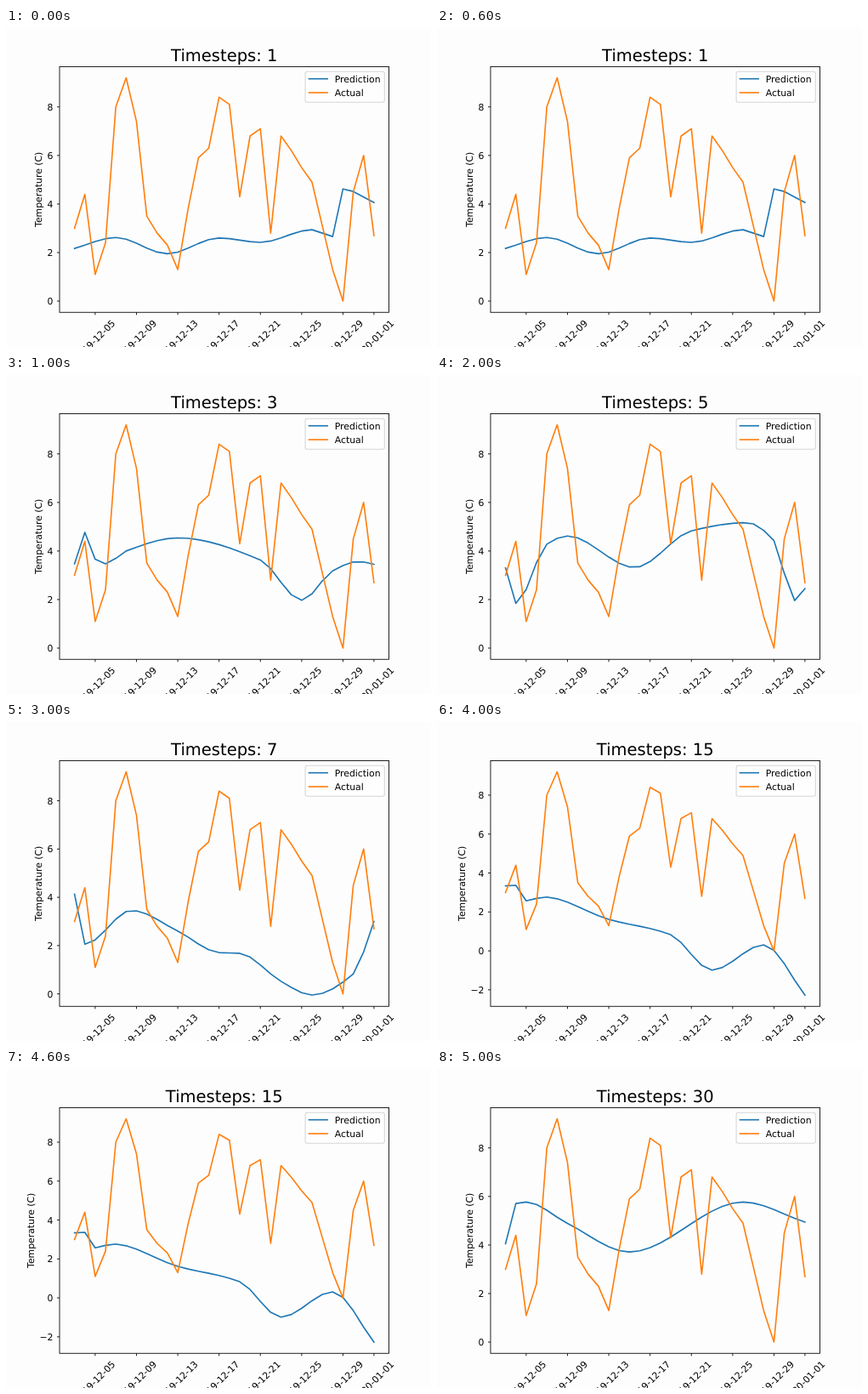
These frames come from a looping animation (500x375 px, 6000 ms). An HTML page:

```html
<!DOCTYPE html>
<html lang="en">
<head>
<meta charset="utf-8">
<title>Temperature forecast by timesteps</title>
<style>
  html, body { margin: 0; width: 100%; height: 100%; overflow: hidden; background: #fdfdfd; }
  svg { display: block; width: 500px; height: 375px; }
  text { font: 10.85px "DejaVu Sans", sans-serif; text-rendering: geometricPrecision; fill: #000; }
  #title { font-size: 19.53px; }
  .mid { text-anchor: middle; }
  .end { text-anchor: end; }
  .axis { fill: none; stroke: #000; stroke-width: .87; }
  .line { fill: none; stroke-width: 1.63; stroke-linejoin: round; stroke-linecap: square; }
  .pred { stroke: #1f77b4; }
  .actual { stroke: #ff7f0e; }
</style>
</head>
<body>
<svg viewBox="0 0 500 375">
  <g transform="translate(.5 .4)">
    <text id="title" class="mid" x="256.25" y="38.4"></text>
    <g id="xAxis"></g>
    <g id="yAxis"></g>
    <text id="yLabel" class="mid">Temperature (C)</text>
    <path id="pred" class="line pred"/>
    <path id="actual" class="line actual"/>
    <rect class="axis" x="62.5" y="45.1" width="387.5" height="288.75"/>
    <g id="legend">
      <rect x="351.6" y="50.8" width="93.2" height="36" rx="2.2" fill="#fff" fill-opacity=".8" stroke="#ccc" stroke-opacity=".8" stroke-width="1.08"/>
    </g>
  </g>
</svg>
<script>
const $ = id => document.getElementById(id);
const HOLD = 1000;
const BOX = { left: 62.5, top: 45, width: 387.5, height: 288.75 };
const DAYS = 30, FONT = 10.85;

const actual = [3, 4.4, 1.1, 2.4, 8, 9.2, 7.4, 3.5, 2.8, 2.3, 1.3, 3.8, 5.9, 6.3, 8.4,
  8.1, 4.3, 6.8, 7.1, 2.8, 6.8, 6.2, 5.5, 4.9, 3.1, 1.3, 0, 4.5, 6, 2.7];

// Each forecast is a smooth curve through a few [day, temperature] points.
const runs = [
  { steps: 1, keys: [[0, 2.17], [4, 2.62], [9, 1.95], [14, 2.6], [18, 2.42], [23, 2.94], [25, 2.66], [26, 4.62], [29, 4.06]] },
  { steps: 3, keys: [[0, 3.47], [1, 4.77], [2, 3.66], [3, 3.47], [5, 4], [10, 4.54], [18, 3.63], [22, 1.97], [25, 3.18], [27.5, 3.57], [29, 3.45]] },
  { steps: 5, keys: [[0, 3.3], [1, 1.84], [4, 4.28], [6, 4.62], [12.5, 3.32], [18, 4.83], [23.4, 5.17], [26, 4.43], [28, 1.96], [29, 2.45]] },
  { steps: 7, keys: [[0, 4.13], [1, 2.06], [5.5, 3.46], [10, 2.6], [14, 1.71], [16, 1.68], [20, .52], [23, -.05], [27, .83], [29, 3]] },
  { steps: 15, keys: [[0, 3.34], [1, 3.37], [2, 2.57], [3.7, 2.77], [10, 1.62], [16, .83], [20, -.99], [25, .31], [29, -2.27]] },
  { steps: 30, keys: [[0, 4.05], [1, 5.71], [2, 5.77], [6, 4.89], [12, 3.71], [23, 5.77], [29, 4.94]] }
];

// Monotone cubic through the keys, flat at every turning point.
function curve(keys) {
  const last = keys.length - 1;
  const secant = k => (keys[k + 1][1] - keys[k][1]) / (keys[k + 1][0] - keys[k][0]);
  const slope = k => {
    if (k === 0 || k === last) return secant(Math.min(k, last - 1));
    const a = secant(k - 1), b = secant(k);
    return a * b <= 0 ? 0 : 2 * a * b / (a + b);
  };
  return day => {
    const k = Math.max(1, keys.findIndex(([d]) => d >= day));
    const [d0, v0] = keys[k - 1], [d1, v1] = keys[k];
    const h = d1 - d0, t = (day - d0) / h, s = 1 - t;
    return v0 * (1 + 2 * t) * s * s + v1 * (3 - 2 * t) * t * t
      + h * t * s * (slope(k - 1) * s - slope(k) * t);
  };
}

const xAt = day => BOX.left + BOX.width * (1 + 20 * day / (DAYS - 1)) / 22;

function yScale(temps) {
  const all = actual.concat(temps), min = Math.min(...all), max = Math.max(...all);
  const pad = (max - min) / 20, lo = min - pad, hi = max + pad;
  return { lo, hi, y: v => BOX.top + BOX.height * (hi - v) / (hi - lo) };
}

const trace = (temps, y) =>
  "M" + temps.map((v, day) => xAt(day).toFixed(2) + "," + y(v).toFixed(2)).join("L");

function drawXAxis() {
  const ticks = Array.from({ length: 7 }, (_, i) => 2 + 4 * i).concat(DAYS - 1);
  $("xAxis").innerHTML = ticks.map(day => {
    const date = new Date(Date.UTC(2019, 11, 3 + day)).toISOString().slice(0, 10), x = xAt(day);
    return `<path class="axis" d="M${x} 333.9v3"/>
      <text class="mid" y="2.9" transform="translate(${x} 367.6) rotate(-45)">${date}</text>`;
  }).join("");
}

function drawLegend() {
  [["pred", "Prediction", 59.3], ["actual", "Actual", 75.6]].forEach(([cls, name, y]) =>
    $("legend").insertAdjacentHTML("beforeend",
      `<path class="line ${cls}" d="M356 ${y}h21.7"/><text x="386.2" y="${y + 4}">${name}</text>`));
}

function drawRun({ steps, keys }) {
  const temps = Array.from({ length: DAYS }, (_, day) => curve(keys)(day));
  const { lo, hi, y } = yScale(temps);
  let out = "";
  for (let v = Math.ceil(lo / 2) * 2; v <= hi; v += 2) {
    const label = v < 0 ? "\u2212" + -v : Math.abs(v);
    out += `<path class="axis" d="M62.5 ${y(v)}h-3"/><text class="end" x="54.9" y="${y(v) + 4.1}">${label}</text>`;
  }
  $("yAxis").innerHTML = out;
  const labelX = 41.2 - (lo <= -2 ? .838 * FONT : 0);
  $("yLabel").setAttribute("transform", `translate(${labelX} 189.4) rotate(-90)`);
  $("title").textContent = "Timesteps: " + steps;
  $("pred").setAttribute("d", trace(temps, y));
  $("actual").setAttribute("d", trace(actual, y));
}

let shown = -1;
const start = performance.now();
function update(now) {
  const i = Math.floor(Math.max(0, now - start) / HOLD) % runs.length;
  if (i !== shown) drawRun(runs[shown = i]);
  requestAnimationFrame(update);
}

drawXAxis();
drawLegend();
update(start);
</script>
</body>
</html>
```
